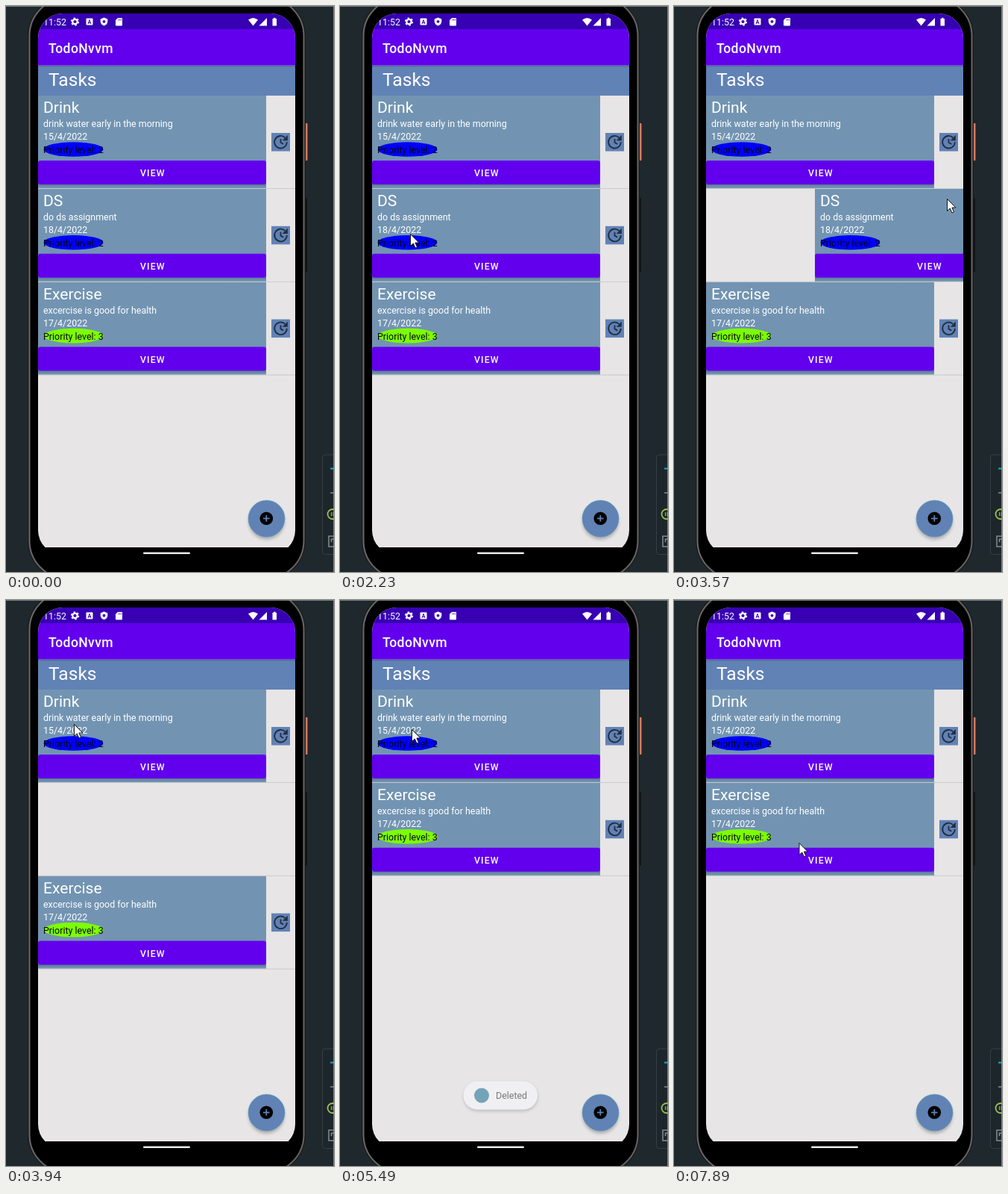
Animation, 440 px wide and 758 px high, one loop 8 s. Source, as an HTML page:

```html
<!DOCTYPE html>
<html lang="en">
<head>
<meta charset="utf-8">
<title>Task list swipe</title>
<style>
html, body { margin: 0; width: 100%; height: 100%; overflow: hidden; background: #1f282d; }
svg { display: block; width: 440px; height: 758px; }
text { font-family: Roboto, sans-serif; font-size: 12.45px; fill: #fff; }
.app { font-weight: 500; font-size: 17.6px; letter-spacing: .35px; }
.page { font-size: 24.6px; }
.head { font-size: 21.1px; }
.btn { font-weight: 500; font-size: 12.3px; letter-spacing: 1.1px; }
.level { fill: #050510; }
.note { fill: #7a7a7a; }
</style>
</head>
<body>
<svg viewBox="0 0 440 758" xmlns="http://www.w3.org/2000/svg">
  <defs>
    <clipPath id="glass"><rect x="43" y="10" width="345" height="725" rx="33"/></clipPath>
    <linearGradient id="drop" x2="0" y2="1">
      <stop stop-opacity=".22"/><stop offset="1" stop-opacity="0"/>
    </linearGradient>
    <linearGradient id="rim">
      <stop stop-color="#6a6a6a"/><stop offset=".5" stop-color="#333"/><stop offset="1" stop-color="#666"/>
    </linearGradient>
    <filter id="blur" x="-30%" y="-30%" width="160%" height="160%"><feGaussianBlur stdDeviation="2"/></filter>
    <g id="update">
      <path d="M17.6 6.3A8 8 0 1 0 20 12.1M12 8v4.6l3.6 2.1" fill="none" stroke="#222e40" stroke-width="1.8"/>
      <path d="M21 3v7.1h-6.8z" fill="#222e40"/>
    </g>
  </defs>

  <!-- desktop and side panel -->
  <rect width="440" height="758" fill="#1f282d"/>
  <rect x="424.5" y="601" width="30" height="133.5" rx="4" fill="#1d262b" stroke="#354046"/>
  <path d="M435 619.5h5" stroke="#1fa9c4" stroke-width="2"/>
  <path d="M435 652h5M440 710h-7v14h7M440 714h-3.5v4" fill="none" stroke="#868d90" stroke-width="1.5"/>
  <circle cx="438" cy="680.5" r="6.5" fill="none" stroke="#9bc24c" stroke-width="1.8"/>
  <path d="M436.500 678v5M439 678v5" stroke="#9bc24c"/>

  <!-- phone body -->
  <rect x="401" y="157" width="3.5" height="50" rx="1" fill="#d9785c"/>
  <rect x="401" y="257" width="3" height="99" rx="1" fill="#101415"/>
  <rect x="29" y="-13" width="373" height="782" rx="53" fill="#1c1c1c"/>
  <rect x="31.5" y="-11" width="368" height="778" rx="51" fill="#000" stroke="url(#rim)" stroke-width="2"/>
  <rect x="184" y="731.5" width="63" height="2.5" rx="1.2" fill="#e8e8e8"/>

  <g clip-path="url(#glass)">
    <rect x="43" y="10" width="345" height="715" fill="#e7e5e6"/>
    <g id="rows"></g>
    <g id="lines"></g>
    <rect x="43" y="79.5" width="345" height="40.5" fill="#6182b5"/>
    <rect x="43" y="79.5" width="345" height="3" fill="url(#drop)"/>
    <text class="page" x="57" y="107">Tasks</text>
    <rect x="43" y="10" width="345" height="21" fill="#3700b3"/>
    <rect x="43" y="31" width="345" height="48.5" fill="#6200ee"/>
    <text class="app" x="57" y="62.5">TodoNvvm</text>

    <!-- status bar -->
    <text x="50" y="26">11:52</text>
    <g fill="#fff">
      <circle cx="92.5" cy="21" r="3.2" fill="none" stroke="#fff" stroke-width="2.2"/>
      <circle cx="92.5" cy="21" r="4.8" fill="none" stroke="#fff" stroke-width="1.6" stroke-dasharray="2.5 2.526"/>
      <rect x="107.5" y="16.5" width="9" height="9" rx="1"/>
      <path d="M110 24l2-5.500 2 5.500M110.800 22.400h2.400" fill="none" stroke="#3700b3"/>
      <path d="M131.500 15.500l4.800 2v3.500q-.5 4-4.800 5.500-4.300-1.500-4.800-5.500v-3.500z"/>
      <circle cx="131.5" cy="20.8" r="1.9" fill="#3700b3"/>
      <path d="M150 16h5q1 0 1 1v8.500q0 1-1 1h-7q-1 0-1-1v-6.500z"/>
      <path d="M150.500 18.500h4.500" stroke="#3700b3" stroke-width="2" stroke-dasharray=".8 1"/>
      <path d="M325 18.500q6.500-5 13 0l-6.500 8z"/>
      <path d="M350 16v10.500h-10.500z"/>
      <path d="M357.500 17h1.500v-1.200h2.500v1.200h1.500v9.500h-5.500z"/>
    </g>

    <!-- add button -->
    <circle cx="349.5" cy="690.5" r="24" opacity=".25" filter="url(#blur)"/>
    <circle cx="349.5" cy="686.5" r="24.5" fill="#6182b5" stroke="#58a0b8" stroke-width=".7"/>
    <circle cx="349.3" cy="686.3" r="8.8"/>
    <path d="M345 686.300h8.600M349.300 682v8.600" stroke="#6182b5" stroke-width="1.8"/>

    <g id="toast">
      <rect class="fine" x="166" y="646.5" width="99" height="38" rx="19" filter="url(#blur)" fill="#b9b8ba"/>
      <rect x="165.5" y="644.5" width="99.5" height="38" rx="19" fill="#f0eff1"/>
      <g class="fine">
        <circle cx="190" cy="663.5" r="10" fill="#74a3b8"/>
        <text class="note" x="209" y="668">Deleted</text>
      </g>
    </g>
  </g>
  <path d="M0 .5H440M439.500 0V758" stroke="#8d9496" stroke-width=".8"/>
  <path id="cursor" d="M.5.500v16l3.800-3.500 2.700 6 2.500-1.100-2.600-5.900h5z" fill="#fff" stroke="#111" stroke-linejoin="round"/>
</svg>
<script>
const LOOP = 8000, PITCH = 124.8, STEP = 130, REST = 380;
const GRAB = 220, RELEASE = 3815, REMOVED = 4090, FADE = 6050;
const $ = id => document.getElementById(id);

// pointer stops: time, x, y
const stops = [
  [800, 197, 621], [1040, 167, 515], [1430, 152, 489], [1700, 106, 363],
  [1960, 90, 312], [2230, 94, 305], [2490, 168, 265], [3040, 171, 263],
  [3190, 197, 262], [3570, 366, 258], [3690, 409, 244], [3940, 91, 166],
  [4090, 101, 165], [5490, 96, 173], [5770, 397, 310], [6050, 252, 398],
  [6350, 191, 384], [6600, 174, 352], [6870, 170, 332], [7890, 167.5, 325]
];

// even steps between near stops; over longer gaps the pointer rests
function pointer(t) {
  const i = stops.findLastIndex(s => s[0] <= t);
  if (i < 0) return null;
  const a = stops[i], b = stops[i + 1] || a, gap = b[0] - a[0];
  if (!gap || gap > REST) return { x: a[1], y: a[2] };
  const n = Math.round(gap / STEP);
  const u = Math.floor((t - a[0]) / gap * n) / n;
  return { x: a[1] + (b[1] - a[1]) * u, y: a[2] + (b[2] - a[2]) * u };
}

const row = (title, note, date, level, color) => `<g>
  <rect x="43" y="120" width="306" height="124.2" fill="#7294b2"/>
  <text class="head" x="50" y="143">${title}</text>
  <text x="50" y="162">${note}</text>
  <text x="50" y="179">${date}</text>
  <ellipse cx="90.5" cy="192" rx="40" ry="9.8" fill="${color}"/>
  <text class="level" x="50" y="197">Priority level: ${level}</text>
  <rect x="43" y="238" width="306" height="5" fill="url(#drop)"/>
  <rect x="43" y="207" width="306" height="32" rx="3" fill="#6200ee"/>
  <text class="btn" x="180" y="228">VIEW</text>
  <rect x="356" y="170" width="25" height="24.5" fill="#6182b5"/>
  <use href="#update" transform="translate(356 169.7) scale(1.04)"/>
</g>`;

$('rows').innerHTML =
  row('Drink', 'drink water early in the morning', '15/4/2022', 2, '#0000ff') +
  row('DS', 'do ds assignment', '18/4/2022', 2, '#0000ff') +
  row('Exercise', 'excercise is good for health', '17/4/2022', 3, '#7cff00');
$('lines').innerHTML = [1, 2, 3].map(i =>
  `<path d="M43 ${119.7 + i * PITCH}H388" stroke="#c6c9cc" stroke-width=".9"/>`).join('');

const rows = $('rows').children, lines = $('lines').children;
const toast = $('toast'), fine = toast.querySelectorAll('.fine');
const move = (el, x, y) => el.setAttribute('transform', `translate(${x} ${y})`);
const show = (el, on) => el.setAttribute('visibility', on ? 'visible' : 'hidden');

function draw(t) {
  const p = pointer(t), gone = t >= REMOVED;
  show($('cursor'), p);
  if (p) move($('cursor'), p.x, p.y);

  // the grabbed row follows the pointer, then flies out
  const drag = t >= RELEASE ? 345 : p && t > 3190 ? Math.max(0, p.x - GRAB) : 0;
  move(rows[1], drag, PITCH);
  show(rows[1], !gone);
  move(rows[2], 0, PITCH * (gone ? 1 : 2));
  show(lines[2], !gone);

  // the toast shrinks and fades; its label goes first
  const fade = Math.max(0, 1 - .35 * Math.max(0, Math.floor((t - FADE) / 145)));
  show(toast, gone && fade > 0);
  toast.setAttribute('opacity', fade);
  toast.setAttribute('transform',
    `translate(215 663.5) scale(${.9 + .1 * fade}) translate(-215 -663.5)`);
  fine.forEach(el => el.setAttribute('opacity', Math.max(0, (fade - .3) / .7)));
}

let start;
function tick(now) {
  start ??= now;
  draw((now - start) % LOOP);
  requestAnimationFrame(tick);
}
draw(0);
requestAnimationFrame(tick);
</script>
</body>
</html>
```
